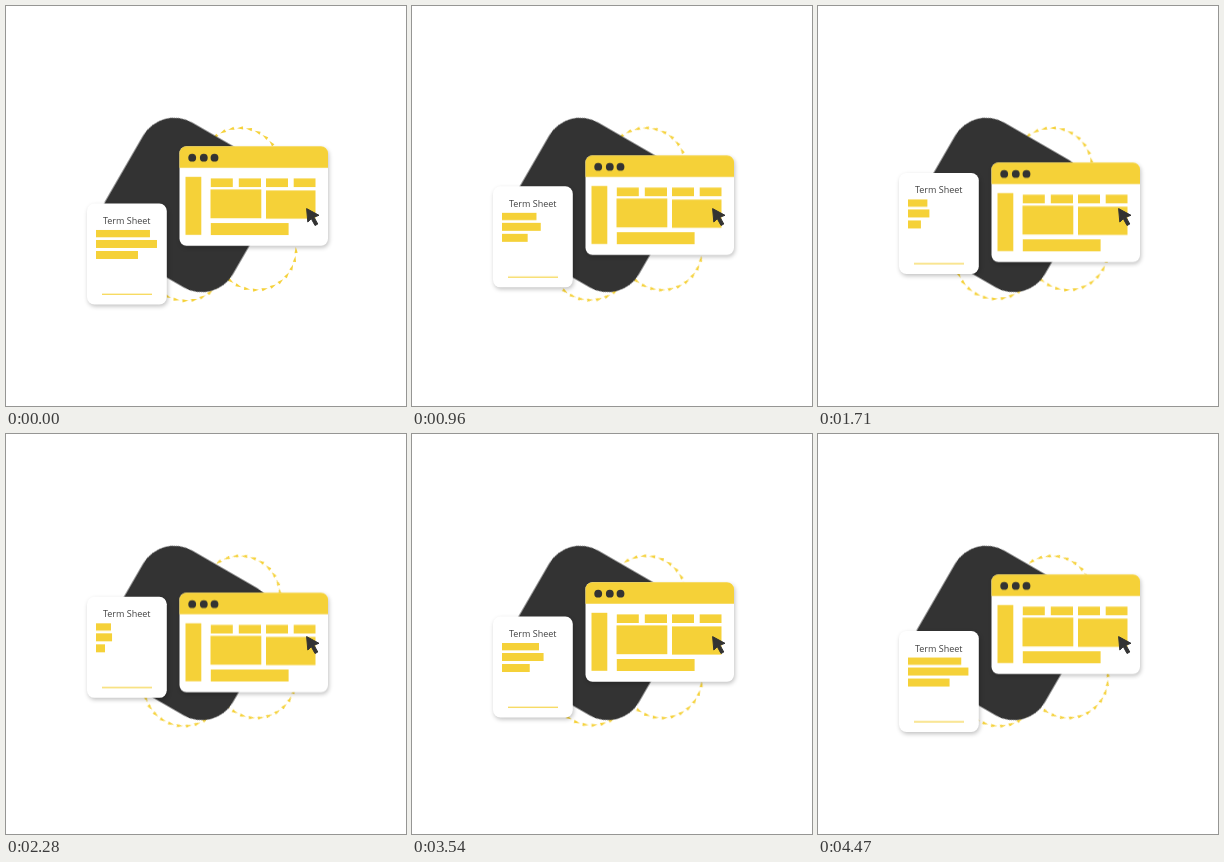
Recreate the animation shown at these times as an HTML page without scripts. Size 400 by 400 pixels, loop 4.5 s.

```html
<!DOCTYPE html>
<html lang="en">
<head>
<meta charset="utf-8">
<title>Term sheet</title>
<style>
  html, body { margin: 0; width: 100%; height: 100%; overflow: hidden; background: #fff; }
  svg { display: block; width: 100%; height: 100%; }

  .yellow { fill: #f5d138; }
  .dark { fill: #333; }
  .panel { filter: drop-shadow(1.5px 2px 2px rgba(0, 0, 0, .24)); }
  .label { font: 9px "Open Sans", "Noto Sans", sans-serif; fill: #404040; text-anchor: middle; }

  .window, .card { animation: shift 4.5s linear infinite; }
  .window { --dy: 20px; }
  .card { --dy: -37.5px; }
  .bar { transform-origin: 90px 0; animation: shrink 4.5s linear infinite; }
  .ring { animation: spin 4.5s linear infinite; }

  /* Out and back at constant speed, turning at 2.1 s */
  @keyframes shift { 46.667% { transform: translateY(var(--dy)); } }
  @keyframes shrink { 46.667% { transform: scaleX(var(--min)); } }
  @keyframes spin { to { transform: rotate(240deg); } }
</style>
</head>
<body>
<svg viewBox="0 0 400 400">
  <defs>
    <!-- A ring of 28 tapered dashes -->
    <path id="dash" class="yellow" d="M-3-39.8 2.8-41.7 3.2-38.5Z"/>
    <g id="pair"><use href="#dash"/><use href="#dash" transform="rotate(12.857)"/></g>
    <g id="four"><use href="#pair"/><use href="#pair" transform="rotate(25.714)"/></g>
    <g id="ring">
      <use href="#four"/>
      <use href="#four" transform="rotate(51.429)"/>
      <use href="#four" transform="rotate(102.857)"/>
      <use href="#four" transform="rotate(154.286)"/>
      <use href="#four" transform="rotate(205.714)"/>
      <use href="#four" transform="rotate(257.143)"/>
      <use href="#four" transform="rotate(308.571)"/>
    </g>
  </defs>

  <g transform="translate(234 162)"><g class="ring"><use href="#ring"/></g></g>
  <g transform="translate(250 244)"><g class="ring"><use href="#ring"/></g></g>
  <g transform="translate(179.5 253)"><g class="ring"><use href="#ring" y="1.8"/></g></g>

  <rect class="dark" x="-73.5" y="-73.5" width="147" height="147" rx="36"
        transform="translate(182 199) rotate(30)"/>

  <g class="window">
    <rect class="panel" x="173.5" y="140.3" width="148.5" height="99.4" rx="7" fill="#fff"/>
    <path class="yellow" d="M173.5 161.8v-14.5a7 7 0 0 1 7-7h134.500a7 7 0 0 1 7 7v14.500z"/>
    <g class="dark">
      <circle cx="186.200" cy="151.700" r="3.900"/>
      <circle cx="197.800" cy="151.700" r="3.900"/>
      <circle cx="208.500" cy="151.700" r="3.900"/>
    </g>
    <g class="yellow">
      <rect x="179.500" y="170.800" width="15.800" height="58"/>
      <rect x="204.800" y="172.400" width="22" height="8.600"/>
      <rect x="232.800" y="172.400" width="22.200" height="8.600"/>
      <rect x="260" y="172.400" width="22" height="8.600"/>
      <rect x="287.700" y="172.400" width="21.800" height="8.600"/>
      <rect x="204.500" y="183.400" width="50.800" height="28.800"/>
      <rect x="260" y="184.400" width="49.500" height="28.200"/>
      <rect x="204.800" y="217" width="77.800" height="12"/>
    </g>
  </g>

  <g class="card">
    <rect class="panel" x="81" y="197.500" width="79.800" height="101" rx="7.500" fill="#fff"/>
    <text class="label" x="120.700" y="218">Term Sheet</text>
    <g class="yellow">
      <rect class="bar" style="--min: .2185" x="90" y="224" width="54" height="7.300"/>
      <rect class="bar" style="--min: .203" x="90" y="234" width="61" height="8"/>
      <rect class="bar" style="--min: .15" x="90" y="245" width="42" height="8"/>
      <rect x="96" y="287.700" width="50" height="1.100"/>
    </g>
  </g>

  <path class="dark" stroke="#333" stroke-linejoin="round"
        d="M300.600 202.600 313 209.300 308 211.200 311.800 218 309 219.500 305.300 212.700 301.800 216Z"/>
</svg>
</body>
</html>
```
